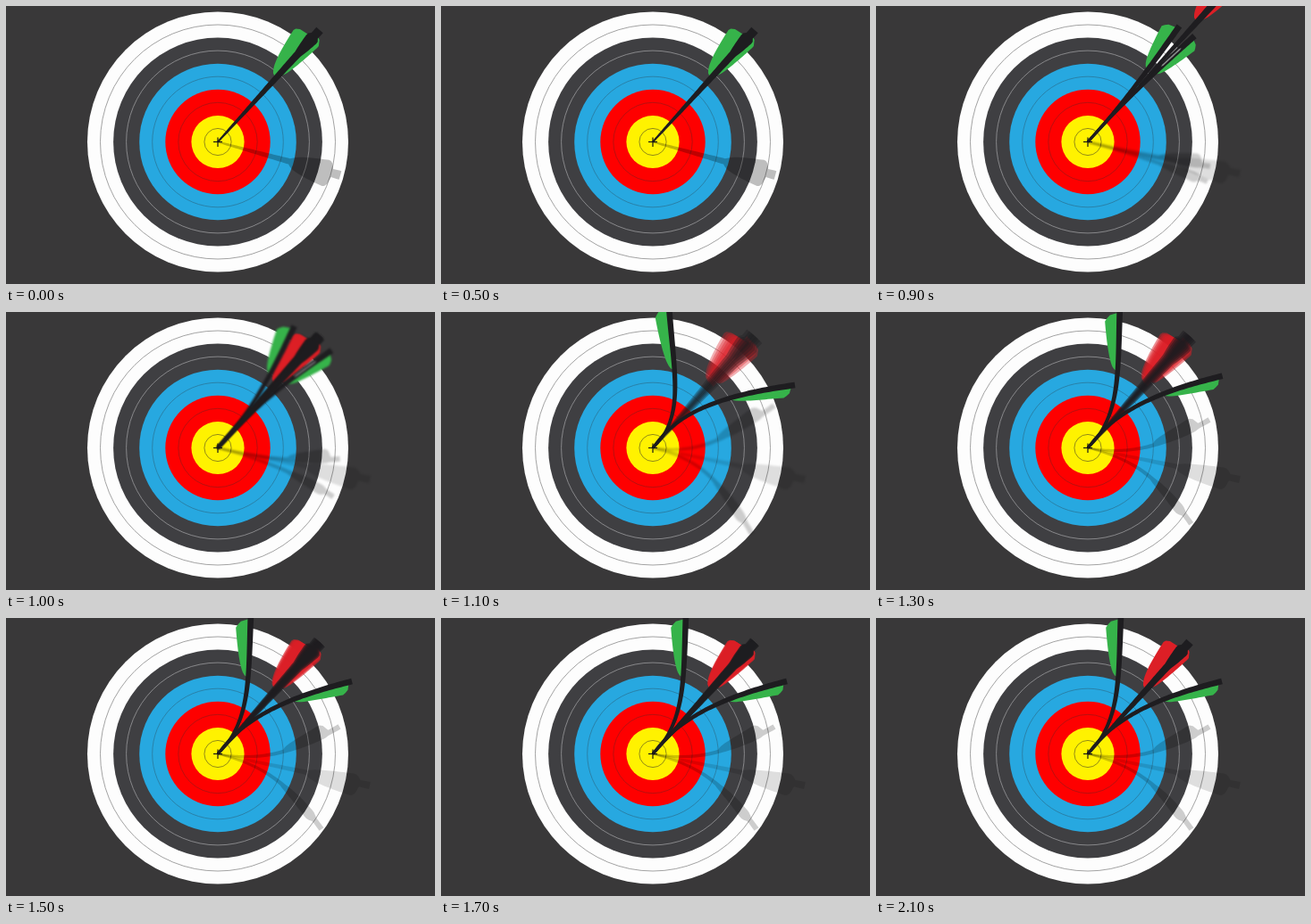
Write an HTML page with a canvas that moves like this. It is 480 by 312 pixels and loops after 2200 ms.

```html
<!DOCTYPE html>
<html lang="en">
<head>
<meta charset="utf-8">
<title>Split arrow</title>
<style>
html, body { margin: 0; width: 100%; height: 100%; overflow: hidden; background: #393839; }
canvas { display: block; }
</style>
</head>
<body>
<canvas id="stage" width="480" height="312"></canvas>
<script>
const ctx = document.getElementById('stage').getContext('2d');
const HIT = [237, 152.5], LOOP = 2200, STEP = 100;
const BLACK = '#1e1d20', GREEN = '#36b34a', RED = '#dc1f26';

const mix = (a, b, k) => a.map((v, i) => v + (b[i] - v) * k);
const straightTo = tail => [HIT, mix(HIT, tail, 1 / 3), mix(HIT, tail, 2 / 3), tail];

// A shaft is a cubic curve from the hit point to its tail.
const ARROW = straightTo([351, 27]);
const SHADOW = straightTo([374, 190]);
const RED_SHADOW = straightTo([407, 188]);

// The halves at rest, with vane widths to the left and right.
const halves = [
  { curve: [HIT, [274, 116], [271, 70], [274, -3]], vane: [17, 0] },
  { curve: [HIT, [270, 108], [320, 88], [387, 71]], vane: [0, 13] }
];
const halfShadows = [
  { curve: [HIT, [282, 160], [315, 155], [373, 122]], vane: [13, 4] },
  { curve: [HIT, [285, 165], [312, 180], [353, 237]], vane: [5, 7] }
];

const shaft = (from, to) => t => from + (to - from) * t;
// A vane grows from its thin front and is cut off at the back.
const vane = (width, front, back) => t => {
  const u = (t - front) / (back - front);
  return u < 0 || u > 1 ? 0 : width * u ** 0.4 * Math.min(1, (1.15 - u) * 4);
};
const widest = (f, g) => t => Math.max(f(t), g(t));

function pointAt(curve, t) {
  let p = curve, dir;
  while (p.length > 1) {
    if (p.length === 2) dir = [p[1][0] - p[0][0], p[1][1] - p[0][1]];
    p = p.slice(1).map((q, i) => mix(p[i], q, t));
  }
  const len = Math.hypot(...dir);
  return { x: p[0][0], y: p[0][1], nx: dir[1] / len, ny: -dir[0] / len };
}

// Fill the band that reaches left(t) and right(t) from the curve.
function band(curve, left, right, color) {
  const a = [], b = [], n = 60;
  for (let i = 0; i <= n; i++) {
    const t = i / n, { x, y, nx, ny } = pointAt(curve, t);
    a.push([x + nx * left(t), y + ny * left(t)]);
    b.unshift([x - nx * right(t), y - ny * right(t)]);
  }
  ctx.beginPath();
  for (const p of a.concat(b)) ctx.lineTo(...p);
  ctx.closePath();
  ctx.fillStyle = color;
  ctx.fill();
}

function line(x1, y1, x2, y2) {
  ctx.beginPath();
  ctx.moveTo(x1, y1);
  ctx.lineTo(x2, y2);
  ctx.strokeStyle = '#151515';
  ctx.lineWidth = 1.2;
  ctx.stroke();
}

function disc(r) {
  ctx.beginPath();
  ctx.arc(...HIT, r, 0, 7);
}

function target() {
  ctx.fillStyle = '#393839';
  ctx.fillRect(0, 0, 480, 312);
  const bands = [['#fdfdfd', '#8c8c8c'], ['#3f3f42', '#9a9a9c'], ['#27a8e0', '#2a789b'],
                 ['#fe0000', '#a81414'], ['#fff200', '#77701c']];
  bands.forEach(([fill, ring], i) => {
    const r = 146 - i * 29.1;
    disc(r);
    ctx.fillStyle = fill;
    ctx.fill();
    disc(r - 14.5);
    ctx.strokeStyle = ring;
    ctx.lineWidth = 0.8;
    ctx.stroke();
  });
}

const drawVanes = color =>
  band(ARROW, vane(23, 0.57, 0.93), vane(12, 0.6, 0.95), color);

function drawShaft() {
  const f = widest(shaft(1, 5), vane(8, 0.75, 0.95));
  band(ARROW, f, f, BLACK);
}

function drawShadow(curve, [left, right], thick, alpha) {
  const body = shaft(1, thick);
  band(curve, widest(body, vane(left, 0.58, 0.93)), widest(body, vane(right, 0.58, 0.93)),
    `rgba(0,0,0,${alpha})`);
}

// Repeat a drawing across the angle the arrow shivers through.
function shiver(paint, degrees, shift) {
  const copies = degrees > 0.05 ? 5 : 1;
  for (let i = 0; i < copies; i++) {
    ctx.save();
    ctx.translate(HIT[0] + 114 * shift, HIT[1] - 125.5 * shift);
    if (copies > 1) {
      ctx.globalAlpha = 0.9 - 0.25 * degrees;
      ctx.rotate((i / 2 - 1) * degrees * Math.PI / 180);
    }
    ctx.translate(-HIT[0], -HIT[1]);
    paint();
    ctx.restore();
  }
}

// 0 is the whole arrow, 1 the half at rest, above 1 it swings past.
const opened = (part, from, open) => part.curve.map((p, i) => mix(from[i], p, open));

function drawHalves(open) {
  const body = shaft(1.5, 3.4), mark = t => t > 0.7 && t < 0.88 ? 0.8 : 0;
  for (const part of halves) {
    const curve = opened(part, ARROW, open), [left, right] = part.vane;
    band(curve, vane(left, 0.64, 0.97), vane(right, 0.64, 0.97), GREEN);
    band(curve, body, body, BLACK);
    if (open < 1 && right) band(curve, mark, mark, '#8a8a8c');
  }
}

const soften = r => { ctx.filter = r > 0 ? `blur(${r}px)` : 'none'; };

function drawWhole() {
  drawShadow(SHADOW, [14, 18], 5, 0.25);
  drawVanes(GREEN);
  drawShaft();
}

function drawSplit(n) {
  const open = n < 3 ? 0.37 * (n / 2) ** 1.3 : 1 + 0.25 * (-0.25) ** (n - 3);
  const shake = n < 3 ? 0.5 * (n - 1) : 2.2 * (1 - (n - 3) / 10) ** 1.5;
  const shift = Math.max(0, 1 - n / 2);
  const blur = Math.max(0, 0.8 - Math.abs(n - 2) * 0.25);

  soften(blur + 0.3);
  drawShadow(RED_SHADOW, [10, 16], 4, 0.12);
  for (const part of halfShadows) drawShadow(opened(part, SHADOW, open), part.vane, 3, 0.19);
  soften(blur);
  shiver(() => drawVanes(RED), shake, shift);
  drawHalves(open);
  shiver(drawShaft, shake, shift);
  soften(0);
}

function draw(i) {
  const n = i - 8;
  target();
  if (n < 1) drawWhole();
  else drawSplit(n);
  if (n === 0) {
    shiver(() => drawVanes(RED), 0, 0.95);
    shiver(drawShaft, 0, 0.95);
  }
  line(232, 152.5, 242, 152.5);
  line(237, 147.5, 237, 158);
}

let shown = -1;
function tick() {
  const i = Math.floor(performance.now() % LOOP / STEP);
  if (i !== shown) draw(shown = i);
  requestAnimationFrame(tick);
}
tick();
</script>
</body>
</html>
```
